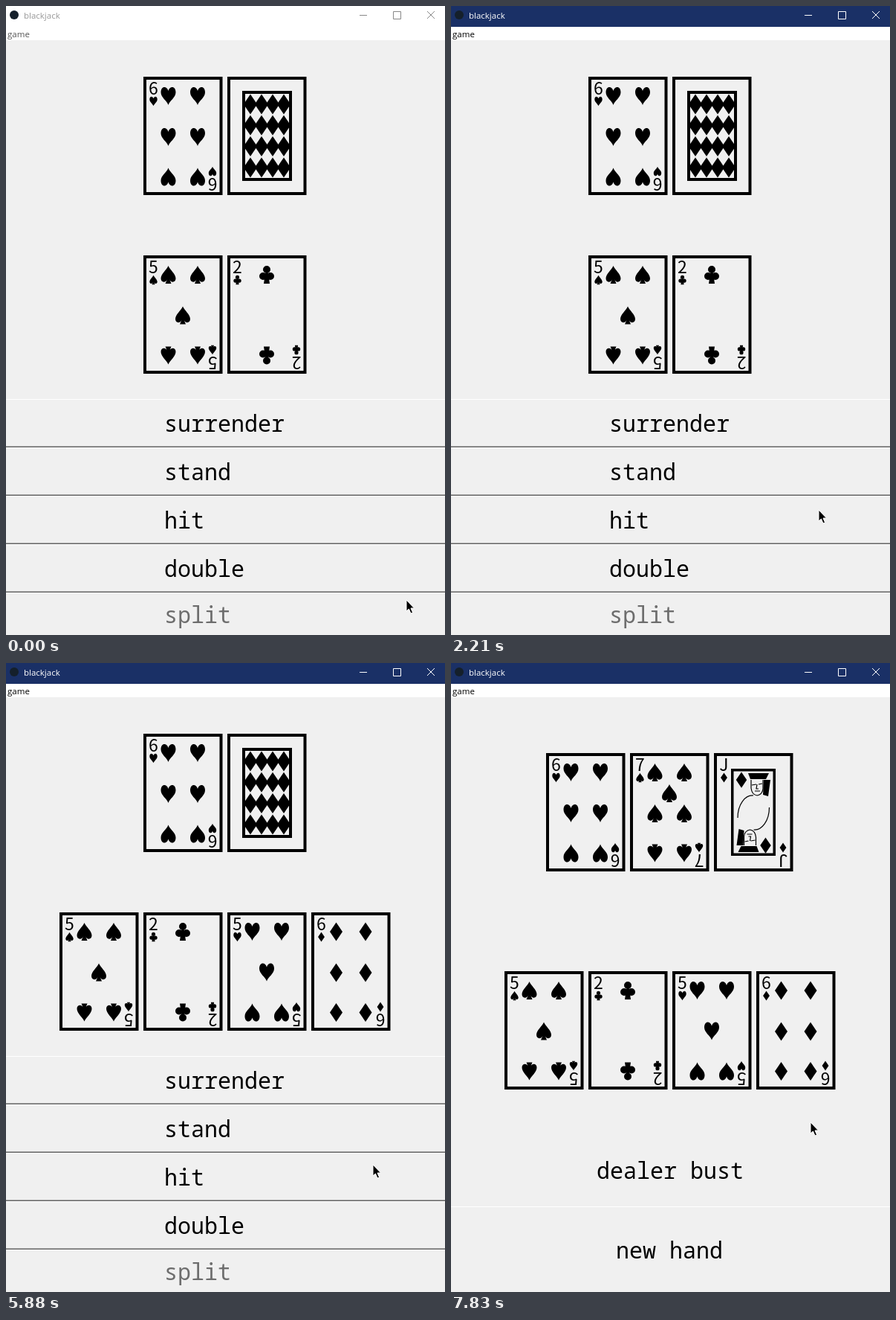
Animation, 591 px wide and 845 px high, one loop 8 s. Source, as an HTML page with a canvas:

```html
<!DOCTYPE html>
<html lang="en">
<head>
<meta charset="utf-8">
<title>blackjack</title>
<style>
html, body { margin: 0; width: 100%; height: 100%; overflow: hidden; background: #f0f0f0; }
canvas { display: block; }
</style>
</head>
<body>
<canvas id="stage" width="591" height="845"></canvas>
<script>
const ctx = document.getElementById('stage').getContext('2d');
const LOOP = 8000, CARD_STEP = 113;
const UI = '11.5px "Open Sans", sans-serif';
const MONO = '30px "Noto Sans Mono", monospace';
const RANK = '300 23px "Noto Sans CJK JP", "Noto Sans CJK", sans-serif';

const disc = (x, y) => `M${x - 5} ${y}a5 5 0 1 1 10 0a5 5 0 1 1-10 0Z`;
const suits = {
  H: new Path2D('M0 12C-2 6-10 2-10-5C-10-14-2-14 0-7C2-14 10-14 10-5C10 2 2 6 0 12Z'),
  S: new Path2D('M0-12C2-7 10-1 10 5C10 11 3 11 1.5 6L4 12H-4L-1.5 6C-3 11-10 11-10 5C-10-1-2-7 0-12Z'),
  C: new Path2D(disc(0, -7) + disc(-5, 2) + disc(5, 2) + 'M-1.5-5H1.5L4 12H-4Z'),
  D: new Path2D('M0-12.5L8.5 0 0 12.5-8.5 0Z')
};

// Pip positions inside a card
const corners = [[33.5, 26], [73, 26], [33.5, 134.5], [73, 134.5]];
const sides = [[33.5, 81], [73, 81]];
const layouts = {
  2: [[53, 26], [53, 134.5]],
  5: [...corners, [53, 80.5]],
  6: [...corners, ...sides],
  7: [...corners, ...sides, [53, 54]]
};

// Cursor moves: start, end, number of steps, from, to, eased
const moves = [
  [0, 350, 5, [539, 798], [491, 427], true],
  [1010, 1860, 12, [491, 427], [492, 601], false],
  [1860, 2210, 5, [492, 601], [495, 677], false],
  [5810, 6300, 7, [495, 677], [484, 617], true]
];
const clicks = [350, 3150, 4960, 6700];

function rect(color, x, y, w, h) {
  ctx.fillStyle = color;
  ctx.fillRect(x, y, w, h);
}

function frame(x, y, w, h, line) {
  ctx.lineWidth = line;
  ctx.strokeRect(x + line / 2, y + line / 2, w - line, h - line);
}

function text(str, x, y, font, color, align = 'left') {
  ctx.font = font;
  ctx.fillStyle = color;
  ctx.textAlign = align;
  ctx.fillText(str, x, y);
}

function pip(suit, x, y, scale = 1, flipped = false) {
  ctx.save();
  ctx.translate(x, y);
  ctx.scale(scale, flipped ? -scale : scale);
  ctx.fill(suits[suit]);
  ctx.restore();
}

// Draws something twice, the second time turned by half a turn
function twice(draw) {
  draw();
  ctx.save();
  ctx.translate(106.5, 160);
  ctx.rotate(Math.PI);
  draw();
  ctx.restore();
}

const hat = new Path2D('M46 27H74L70 35H49ZM67 36H76L73 58L66 56Z');
const face = new Path2D('M50 36V47Q51 56 58 57Q65 56 66 48V36M51 43L57 42M60 42L65 41' +
  'M58 42L57 48H60M55 51H62M32 87C32 69 42 56 53 57');

function cardBack() {
  frame(20, 19, 67, 121, 4);
  for (let row = 0; row < 4; row++)
    for (let col = 0; col < 4; col++)
      pip('D', 31 + 15 * col, 37 + 28.3 * row, 1.08);
}

function jack(suit) {
  frame(23, 21, 60, 117, 3.5);
  ctx.lineWidth = 1.2;
  twice(() => {
    pip(suit, 37, 36, 0.85);
    ctx.fill(hat);
    ctx.stroke(face);
  });
}

function card(code, x, y) {
  const [rank, suit] = code;
  ctx.save();
  ctx.translate(x, y);
  ctx.fillStyle = ctx.strokeStyle = '#000';
  frame(0, 0, 106.5, 159, 4);
  if (code === 'back') {
    cardBack();
  } else {
    twice(() => {
      text(rank, 13.5, 24, RANK, '#000', 'center');
      pip(suit, 13.5, 33, 0.52);
    });
    if (rank === 'J') jack(suit);
    else for (const [px, py] of layouts[rank]) pip(suit, px, py, 1, py > 100);
  }
  ctx.restore();
}

function hand(codes, y) {
  const left = Math.floor(298 - CARD_STEP / 2 * codes.length);
  codes.forEach((code, i) => card(code, left + CARD_STEP * i, y));
}

function button(label, x, y, h, baseline, color, pressed) {
  rect('#f0f0f0', 0, y, 591, h);
  if (pressed) {
    rect('#696969', 0, y, 591, 1);
    rect('#a0a0a0', 0, y + 1, 591, 1);
    rect('#fff', 0, y + h - 1, 591, 1);
  } else {
    rect('#fff', 0, y, 591, 1);
    rect('#a0a0a0', 0, y + h - 2, 591, 1);
    rect('#696969', 0, y + h - 1, 591, 1);
  }
  const shift = pressed ? 1 : 0;
  text(label, x + shift, baseline + shift, MONO, color);
}

function titleBar(focused) {
  const ink = focused ? '#fff' : '#999';
  rect(focused ? '#1a3066' : '#fff', 0, 0, 591, 28);
  rect('#fff', 0, 28, 591, 18);
  ctx.fillStyle = '#15202b';
  ctx.beginPath();
  ctx.arc(11, 12, 6, 0, 7);
  ctx.fill();
  text('blackjack', 24, 17, UI, ink);
  text('game', 2, 42, UI, focused ? '#000' : '#555');
  ctx.strokeStyle = focused ? '#fff' : '#888';
  ctx.lineWidth = 1;
  ctx.stroke(new Path2D('M476 12.5H486M521.5 7.5H531.5V17.5H521.5ZM567 7L577 17M577 7L567 17'));
}

const arrow = new Path2D('M0 0V15L3.4 12 6 18 8.6 17 6 11H10.5Z');

function cursor(t, clicking) {
  const [start, end, steps, from, to, eased] = moves.filter(m => t >= m[0]).pop();
  let p = Math.min(1, Math.floor((t - start) / (end - start) * steps + 1e-6) / steps);
  if (eased) p = p * p * (3 - 2 * p);
  const [x, y] = from.map((v, i) => Math.round(v + (to[i] - v) * p));
  ctx.save();
  ctx.translate(x, y);
  ctx.strokeStyle = '#fff';
  ctx.lineWidth = 1;
  ctx.fillStyle = '#000';
  ctx.fill(arrow);
  ctx.stroke(arrow);
  if (clicking) {
    ctx.fillStyle = 'rgba(255,255,0,.5)';
    ctx.beginPath();
    ctx.arc(0, -1, 12, 0, 7);
    ctx.fill();
  }
  ctx.restore();
}

function draw(t) {
  const click = clicks.find(c => t >= c && t < c + 130);
  const playing = t < 6830, over = t >= 7830;
  const player = ['5S', '2C'];
  if (t >= 3280) player.push('5H');
  if (t >= 5090) player.push('6D');
  const dealer = ['6H', playing ? 'back' : '7S'];
  if (over) dealer.push('JD');

  rect('#f0f0f0', 0, 0, 591, 845);
  titleBar(t >= 350);
  hand(dealer, playing ? 95 : over ? 121 : 175);
  hand(player, playing ? 335 : over ? 414 : 575);

  if (playing) {
    const pressed = { 3150: 'hit', 4960: 'hit', 6700: 'stand' }[click];
    ['surrender', 'stand', 'hit', 'double', 'split'].forEach((label, i) => {
      const last = i === 4;
      button(label, 213, 528 + 65 * i, 65, last ? 829 : 572 + 65 * i,
        last ? '#6d6d6d' : '#000', label === pressed);
    });
  } else if (over) {
    text('dealer bust', 196, 693, MONO, '#000');
    button('new hand', 222, 730, 120, 800, '#000', false);
  }
  cursor(t, click !== undefined);
}

const begin = performance.now();
function tick() {
  draw((performance.now() - begin) % LOOP);
  requestAnimationFrame(tick);
}
tick();
</script>
</body>
</html>
```
